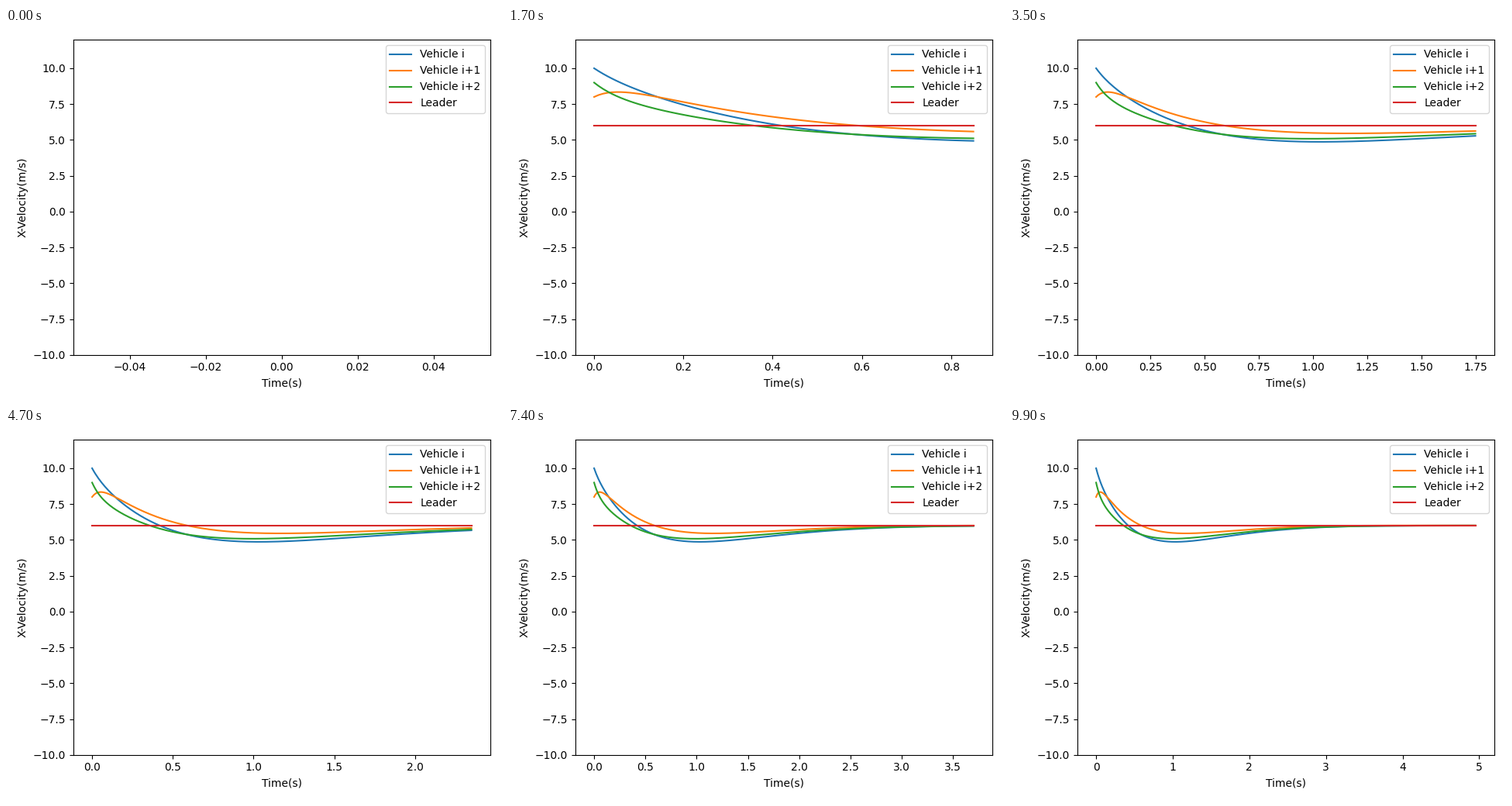
A matplotlib script that plays this animation: 640x480 px, repeating every 10000 ms.

```python
import numpy as np
import matplotlib.pyplot as plt
from matplotlib.animation import FuncAnimation

FRAMES = 100
STEP = 0.05      # simulated seconds per frame
SUB = 5          # curve samples per frame
LEADER = 6.0
SETTLED = 6.01   # shared speed at the last key time

# Speeds at a few key times; the damped response fills in the rest.
KEY_TIMES = np.array([0, 0.05, 0.2, 0.5, 1, 2, 4])
VEHICLES = {
    "Vehicle i": [10, 9.13, 7.45, 5.66, 4.87, 5.46],
    "Vehicle i+1": [8, 8.34, 7.65, 6.25, 5.49, 5.72],
    "Vehicle i+2": [9, 8.07, 6.75, 5.57, 5.08, 5.57],
}


def modes(t):
    """Slow oscillating pair plus three real decays."""
    swing = np.exp((-1.5 + 0.866j) * t)
    decays = [np.exp(-rate * t) for rate in (1.1, 7, 20)]
    return np.stack([swing.real, swing.imag, *decays], axis=-1)


def response(speeds, t):
    gap = np.array(speeds + [SETTLED]) - LEADER
    weight = np.where(KEY_TIMES == 0, 10.0, 1.0)
    coef = np.linalg.lstsq(modes(KEY_TIMES) * weight[:, None], gap * weight, rcond=None)[0]
    return LEADER + modes(t) @ coef


time = np.arange((FRAMES - 1) * SUB + 1) * STEP / SUB
curves = {name: response(speeds, time) for name, speeds in VEHICLES.items()}
curves["Leader"] = np.full_like(time, LEADER)

fig, ax = plt.subplots(figsize=(6.4, 4.8), dpi=100)
lines = {name: ax.plot([], [], label=name)[0] for name in curves}
ax.set_ylim(-10, 12)
ax.set_xlabel("Time(s)")
ax.set_ylabel("X-Velocity(m/s)")
ax.legend(loc="upper right")


def update(i):
    n = i * SUB + 1
    for name, line in lines.items():
        line.set_data(time[:n], curves[name][:n])
    ax.relim()
    ax.autoscale_view(scaley=False)
    fig.tight_layout()
    return list(lines.values())


anim = FuncAnimation(fig, update, frames=FRAMES, interval=1000 * 10 / FRAMES, repeat=True, repeat_delay=0)
plt.show()
```
